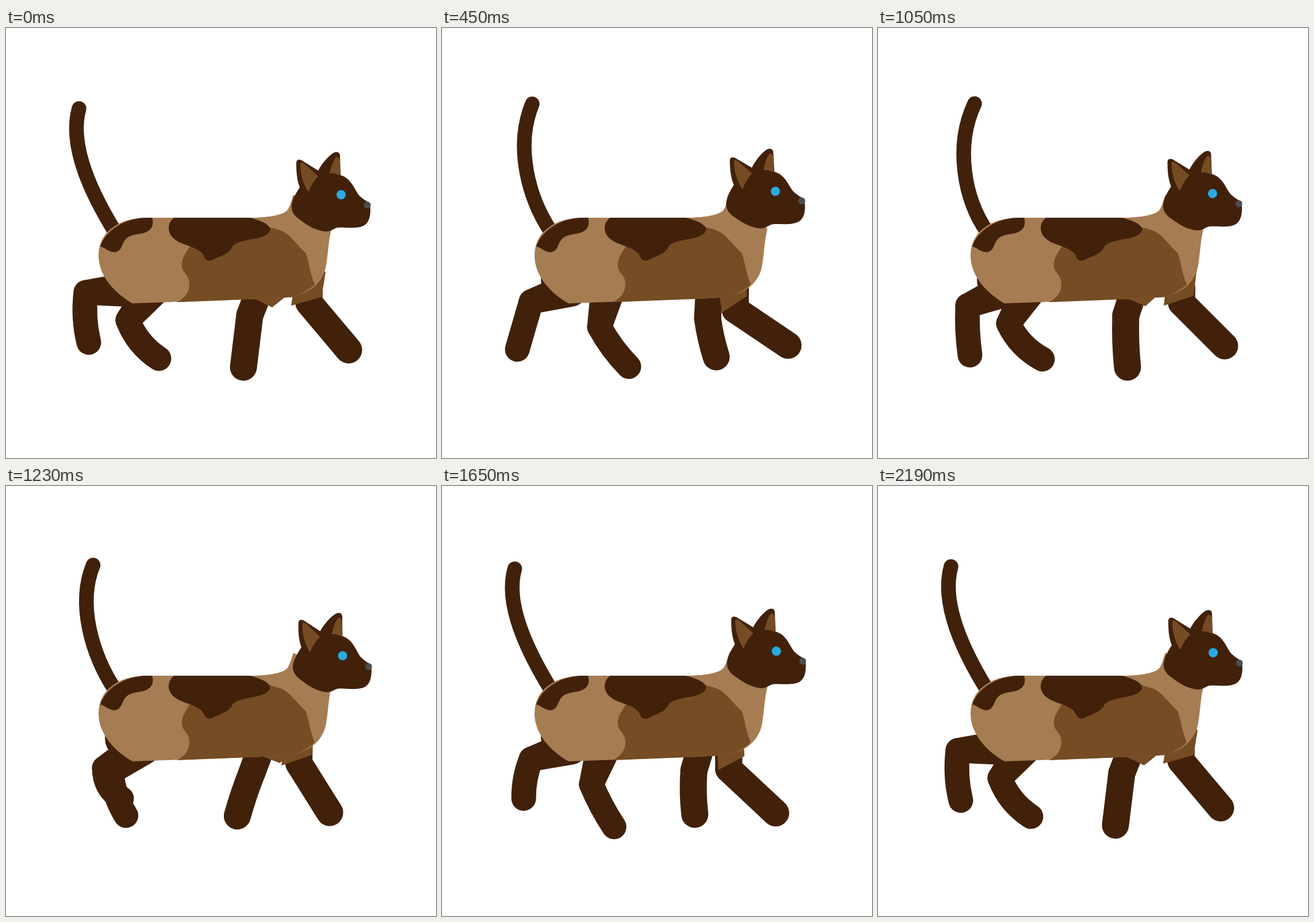
These frames come from a looping animation (748 by 748 pixels, 2.22 s). An HTML page with a canvas:

```html
<!DOCTYPE html>
<html lang="en">
<head>
<meta charset="utf-8">
<title>Walking cat</title>
<style>
html, body { margin: 0; width: 100%; height: 100%; overflow: hidden; background: #fff; }
canvas { display: block; width: 100vmin; height: 100vmin; }
</style>
</head>
<body>
<canvas width="748" height="748"></canvas>
<script>
const ctx = document.querySelector('canvas').getContext('2d');
const DARK = '#42210b', MID = '#754c24', TAN = '#a67c52';
const LOOP = 2220, CYCLE = 2190, STRIDE = CYCLE / 2, STEP = 30;

// Leg keys: time, knee x y, paw x y, bow of the lower leg
const hindA = [
  [0, 212, 508, 266, 575, 14],
  [285, 163, 487, 158, 571, 3],
  [450, 155, 476, 131, 559, 0],
  [570, 155, 475, 145, 543, 8],
  [780, 217, 515, 285, 543, 20],
  [825, 268, 518, 341, 559, 12],
  [940, 258, 517, 322, 584, 10],
  [1050, 227, 514, 286, 576, 14]
];
const hindB = [
  [0, 139, 460, 144, 547, 8],
  [240, 222, 516, 285, 543, 20],
  [285, 268, 518, 342, 562, 12],
  [450, 274, 520, 325, 589, 6],
  [780, 197, 512, 216, 597, 0],
  [825, 190, 510, 199, 595, -4],
  [1050, 156, 483, 160, 569, 4]
];
const foreA = [
  [0, 424, 500, 413, 590, 0],
  [130, 428, 497, 402, 575, 2],
  [240, 465, 497, 500, 540, 8],
  [285, 508, 496, 577, 518, 14],
  [370, 520, 490, 616, 535, 3],
  [450, 510, 490, 602, 552, 0],
  [780, 470, 500, 520, 591, 0],
  [825, 450, 490, 492, 590, 4],
  [1050, 431, 500, 434, 590, 3]
];
const foreB = [
  [0, 527, 478, 596, 560, 0],
  [285, 482, 492, 521, 572, 0],
  [450, 462, 505, 477, 572, 3],
  [620, 430, 490, 428, 570, 4],
  [780, 452, 495, 487, 538, 6],
  [825, 494, 494, 557, 527, 10],
  [930, 525, 485, 616, 540, 2],
  [1050, 528, 478, 603, 553, 0]
];

// Lower edge of the brown fur on each shoulder: time, left x y, right x y
const furA = [
  [0, 412, 461, 463, 486],
  [285, 457, 468, 503, 474],
  [450, 487, 495, 531, 466],
  [780, 443, 487, 495, 483],
  [825, 430, 478, 480, 483],
  [1050, 414, 462, 465, 484]
];
const furB = [
  [0, 496, 483, 549, 468],
  [285, 450, 490, 499, 468],
  [450, 420, 455, 470, 468],
  [780, 430, 465, 480, 468],
  [825, 440, 460, 488, 470],
  [1050, 497, 483, 549, 466]
];

const nod = [[0, 290], [190, 296], [285, 292], [450, 284], [780, 298], [825, 296], [1050, 288]];
const tailTip = [
  [0, 127, 140], [450, 157, 132], [780, 180, 126], [850, 181, 125.5],
  [1050, 168, 131.5], [1380, 139, 141.5], [1620, 127, 144], [1920, 124, 143]
];

const body = new Path2D('M246 330H420C470 330 486 322 490 316C496 306 496 300 500 290L550 320L566 350C561 370 561 385 558 405C555 440 533 458 500 468L446 471L220 479C190 462 161 432 161 396C161 355 195 330 246 330Z');
const flank = new Path2D('M320 379C314 390 304 402 306 414C307 428 319 428 319 446C319 460 310 471 297 477L446 471L500 468C515 463 528 455 537 446C528 425 527 405 521 391C508 380 495 360 480 353Q470 349 455 346L400 360Z');
const saddle = new Path2D('M292 330H424C440 334 456 340 459 348C462 356 450 364 430 367C415 370 400 372 394 380C390 392 375 396 360 403C350 408 346 402 344 396C340 388 328 382 312 377C295 371 283 362 283 348Q283 338 292 330Z');
const rump = new Path2D('M164 380C172 354 205 330 246 330H254C258 342 254 353 238 357C222 360 212 360 205 372C200 382 199 390 187 390C178 389 172 382 164 380Z');
const head = new Path2D('M511 277C505 262 505 245 505 234Q506 227 514 230L543 248C552 232 562 222 570 217Q580 213 581 222L582 256C602 262 606 282 615 292Q625 301 633 304C635 320 634 335 625 342C615 350 595 347 580 347C570 347 568 354 556 354C540 353 525 344 512 334C500 326 496 318 497 308C499 295 505 287 511 277Z');
const ears = new Path2D('M512 236Q513 232 519 236L543 258Q533 268 526 285C519 275 512 258 512 236ZM563 253C566 240 570 228 575 224Q580 224 581 232V257Q572 252 563 253Z');

// Smooth periodic interpolation that never overshoots its keys
function pose(keys, period, time) {
  const t = time % period, n = keys.length;
  const key = i => keys[(i + n) % n];
  const at = i => key(i)[0] + Math.floor(i / n) * period;
  let i = n - 1;
  while (keys[i][0] > t) i--;
  const span = at(i + 1) - at(i), u = (t - at(i)) / span;
  return keys[0].slice(1).map((_, c) => {
    const val = j => key(j)[c + 1];
    const slope = j => (val(j + 1) - val(j)) / (at(j + 1) - at(j));
    const tangent = j => {
      const a = slope(j - 1), b = slope(j);
      return a * b > 0 ? 2 * a * b / (a + b) : 0;
    };
    const v = 1 - u;
    return val(i) * v * v * (1 + 2 * u) + val(i + 1) * u * u * (3 - 2 * u) +
      span * u * v * (tangent(i) * v - tangent(i + 1) * u);
  });
}

function fill(path, color) {
  ctx.fillStyle = color;
  ctx.fill(path);
}

function disc(x, y, r, color) {
  const p = new Path2D();
  p.arc(x, y, r, 0, 7);
  fill(p, color);
}

function stroke(path, width) {
  ctx.strokeStyle = DARK;
  ctx.lineCap = 'round';
  ctx.lineWidth = width;
  ctx.stroke(path);
}

function taper(x1, y1, r1, x2, y2, r2) {
  const a = Math.atan2(y2 - y1, x2 - x1);
  const off = Math.acos((r1 - r2) / Math.hypot(x2 - x1, y2 - y1));
  const p = new Path2D();
  p.arc(x1, y1, r1, a + off, a - off + 2 * Math.PI);
  p.arc(x2, y2, r2, a - off, a + off);
  fill(p, DARK);
}

function leg(hipX, hipY, hipR, r, [kx, ky, px, py, bow]) {
  taper(hipX, hipY, hipR, kx, ky, r);
  const dx = px - kx, dy = py - ky, len = Math.hypot(dx, dy);
  const p = new Path2D();
  p.moveTo(kx, ky);
  p.quadraticCurveTo((kx + px) / 2 - bow * dy / len, (ky + py) / 2 + bow * dx / len, px, py);
  stroke(p, 2 * r);
}

function hindLeg(keys, t) {
  const k = pose(keys, STRIDE, t);
  leg(215 + (k[0] - 140) * 0.55, 455, 30, 21.5, k);
}

function foreLeg(keys, t) {
  const k = pose(keys, STRIDE, t);
  leg(k[0] + Math.max(0, 0.4 * (470 - k[0])), 452, 24, 23.5, k);
}

function fur(keys, t) {
  const [x1, y1, x2, y2] = pose(keys, STRIDE, t);
  const a = Math.atan2(y2 - y1, x2 - x1) - 65 * Math.PI / 180;
  const dx = 45 * Math.cos(a), dy = 45 * Math.sin(a);
  fill(new Path2D(`M${x1} ${y1}L${x2} ${y2}L${x2 + dx} ${y2 + dy}L${x1 + dx} ${y1 + dy}Z`), MID);
}

function tail(t) {
  const [x, y] = pose(tailTip, CYCLE, t), lean = x - 126;
  stroke(new Path2D(`M190 355C150 ${290 + lean * 0.18} ${108 + lean * 0.6} 206 ${x} ${y}`), 25.5);
}

function drawHead(t) {
  const [eyeY] = pose(nod, STRIDE, t);
  ctx.save();
  ctx.translate(333, 415);
  ctx.rotate((eyeY - 290) / 250);
  ctx.translate(-333, -415);
  fill(head, DARK);
  fill(ears, MID);
  disc(583, 290, 8, '#29abe2');
  disc(628.5, 308, 6, '#4d4d4d');
  ctx.restore();
}

function draw(t) {
  ctx.clearRect(0, 0, 748, 748);
  tail(t);
  disc(212, 438, 40, DARK);
  hindLeg(hindA, t);
  hindLeg(hindB, t);
  foreLeg(foreA, t);
  foreLeg(foreB, t);
  fur(furA, t);
  fur(furB, t);
  fill(body, TAN);
  fill(flank, MID);
  fill(saddle, DARK);
  fill(rump, DARK);
  drawHead(t);
}

function tick() {
  draw(Math.floor(performance.now() % LOOP / STEP) * STEP);
  requestAnimationFrame(tick);
}
tick();
</script>
</body>
</html>
```
